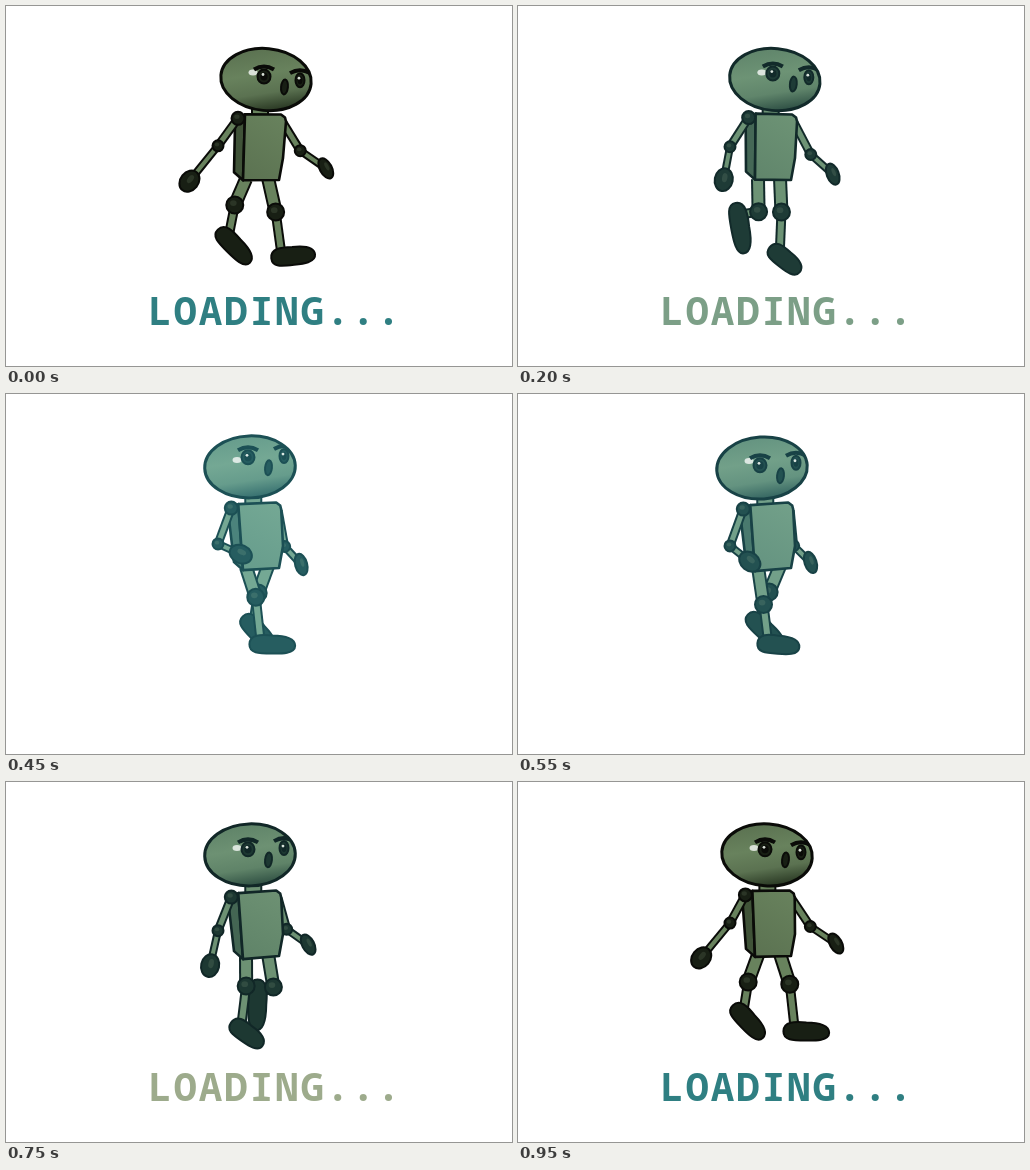
These frames come from a looping animation (506x360 px, 1000 ms). An HTML page with a canvas:

```html
<!DOCTYPE html>
<html lang="en">
<head>
<meta charset="utf-8">
<title>Loading</title>
<style>
html, body { margin: 0; width: 100%; height: 100%; overflow: hidden; background: #fff; }
canvas, svg { position: absolute; left: 0; top: 0; width: 506px; height: 360px; }
text { font: bold 39.2px "Noto Sans Mono", monospace; letter-spacing: 1.9px; stroke: #fff; }
</style>
</head>
<body>
<canvas id="stage" width="506" height="360"></canvas>
<svg viewBox="0 0 506 360"><text id="label" x="142" y="319"></text></svg>
<script>
const LOOP = 1000, STEP = 50;
const ctx = document.getElementById('stage').getContext('2d');
const label = document.getElementById('label');
const letters = [...'LOADING...'].map(ch => {
  const span = document.createElementNS('http://www.w3.org/2000/svg', 'tspan');
  span.textContent = ch;
  return label.appendChild(span);
});

const rgb = hex => [1, 3, 5].map(i => parseInt(hex.slice(i, i + 2), 16));
const css = c => `rgb(${c.map(Math.round)})`;
const mix = (a, b, k) => a.map((v, i) => v + (b[i] - v) * k);
const off = (p, x, y) => [p[0] + x, p[1] + y];
const clamp = x => Math.min(1, Math.max(0, x));
const ease = (u, from, to) => {
  const x = clamp((u - from) / (to - from));
  return x * x * (3 - 2 * x);
};
// Sum of harmonics, each given as [size, place of its peak in the loop]
const wave = (u, mid, ...parts) => parts.reduce(
  (sum, [size, peak], i) => sum + size * Math.cos(2 * Math.PI * (i + 1) * (u - peak)), mid);
const heading = (a, b) => Math.atan2(b[1] - a[1], b[0] - a[0]) * 180 / Math.PI;

// Both legs share this walk, half a loop apart
function stride(u, hip) {
  return {
    hip: off(hip, 0, -6),
    knee: off(hip, wave(u, 0.5, [9.8, 0.457], [3.2, 0.312]),
      wave(u, 25, [3.8, 0.547], [2.9, 0.153], [2.1, 0.24])),
    foot: off(hip, wave(u, 0.9, [19.5, 0.533], [7.3, 0.447], [2, 0.067]),
      wave(u, 62.6, [13, 0.649], [3.8, 0.489], [4.1, 0.053])),
    turn: wave(u, 41, [24.7, 0.136], [21.8, 0.25], [13.2, 0.292]),
    size: wave(u, 47, [6, 0.22])
  };
}

const WARM = { light: rgb('#68825d'), shade: rgb('#25331f'), line: rgb('#0a0b08') };
const COOL = { light: rgb('#74a894'), shade: rgb('#306a6c'), line: rgb('#1c5055') };

function palette(u) {
  const k = clamp(u < 0.45 ? u / 0.45 : (0.95 - u) / 0.5);
  const [light, shade, line] = ['light', 'shade', 'line'].map(n => mix(WARM[n], COOL[n], k));
  return {
    line: css(line), shade: css(shade), limb: css(light),
    mid: css(mix(light, shade, 0.2)),
    side: css(mix(light, shade, 0.6)),
    joint: css(mix(line, shade, 0.5)),
    glow: css(mix(line, light, 0.35)),
    spark: css(mix(light, [255, 255, 255], 0.75))
  };
}

function oval([x, y], rx, ry, fill, line, width = 3, turn = 0) {
  ctx.beginPath();
  ctx.ellipse(x, y, rx, ry, turn * Math.PI / 180, 0, 7);
  ctx.fillStyle = fill;
  ctx.fill();
  if (line) {
    ctx.strokeStyle = line;
    ctx.lineWidth = width;
    ctx.stroke();
  }
}

function poly(points, fill, line) {
  ctx.beginPath();
  points.forEach(p => ctx.lineTo(...p));
  ctx.closePath();
  ctx.fillStyle = fill;
  ctx.strokeStyle = line;
  ctx.lineWidth = 2.6;
  ctx.fill();
  ctx.stroke();
}

function limb(a, b, width, c) {
  for (const [w, color] of [[width + 4, c.line], [width, c.limb]]) {
    ctx.beginPath();
    ctx.moveTo(...a);
    ctx.lineTo(...b);
    ctx.lineWidth = w;
    ctx.strokeStyle = color;
    ctx.stroke();
  }
}

function joint(p, r, c) {
  oval(p, r - 1, r - 1, c.joint, c.line, 2);
  oval(off(p, -r * 0.15, -r * 0.2), r * 0.35, r * 0.3, c.glow);
}

function arm(shoulder, elbow, palm, [rx, ry], bend, c) {
  const turn = heading(elbow, palm) + bend;
  limb(shoulder, elbow, 5, c);
  limb(elbow, palm, 4, c);
  joint(elbow, 6.5, c);
  oval(palm, rx, ry, c.joint, c.line, 2, turn);
  oval(off(palm, 1, -2), rx * 0.4, ry * 0.3, c.glow, null, 0, turn);
}

function leg({ hip, knee, foot, turn, size }, c) {
  const a = turn * Math.PI / 180, x = -size * 0.25, y = -5;
  const ankle = off(foot, x * Math.cos(a) - y * Math.sin(a), x * Math.sin(a) + y * Math.cos(a));
  limb(hip, knee, 10, c);
  limb(knee, ankle, 6, c);
  ctx.save();
  ctx.translate(...foot);
  ctx.rotate(a);
  const h = size / 2 - 1;
  ctx.beginPath();
  ctx.moveTo(-h, 0);
  ctx.bezierCurveTo(-h, -10, -h * 0.5, -10, 0, -9);
  ctx.bezierCurveTo(h * 0.6, -9, h, -6, h, 1);
  ctx.bezierCurveTo(h, 9, h * 0.4, 9, 0, 9);
  ctx.bezierCurveTo(-h * 0.6, 9, -h, 9, -h, 0);
  ctx.fillStyle = c.joint;
  ctx.strokeStyle = c.line;
  ctx.lineWidth = 2;
  ctx.fill();
  ctx.stroke();
  ctx.restore();
  joint(knee, 9.5, c);
}

function eye(p, rx, c) {
  oval(p, rx, 7, c.joint, c.line, 2);
  oval(p, rx * 0.55, 4, c.line);
  oval(off(p, -1, -2), 1.4, 1.4, c.spark);

  const [x, y] = off(p, 0, -9);
  ctx.beginPath();
  ctx.moveTo(x - 10, y + 2);
  ctx.quadraticCurveTo(x, y - 4, x + 10, y + 2);
  ctx.strokeStyle = c.line;
  ctx.lineWidth = 4;
  ctx.stroke();
}

function head(u, x, c) {
  const y = wave(u, 73.2, [0, 0], [1, 0.1]);
  const nod = wave(u, -6, [2.5, 0.85], [5, 0.1]);
  const roll = wave(u, 0.8, [3.5, 0.1]);
  const g = ctx.createLinearGradient(x - 6, y - 32, x + 4, y + 33);
  g.addColorStop(0, c.mid);
  g.addColorStop(0.4, c.limb);
  g.addColorStop(0.7, c.mid);
  g.addColorStop(1, c.shade);
  oval([x, y], 45.3, 31, g, c.line, 3, roll * 1.5);
  ctx.save();
  ctx.clip();
  oval([x - 13, y - 7], 4.5, 3, c.spark);
  eye([x - 2, y + nod], 6.5, c);
  eye([x + 34, y + nod + roll], 4.5, c);
  oval([x + 18.5, y + nod + 10.5], 3.4, 7.5, c.joint, c.line, 2, 6);
  ctx.restore();
}

function robot(u) {
  const c = palette(u);
  const sway = 5 * ease(u, 0.75, 0.95) - 16 * ease(u, 0.12, 0.4);
  const lean = wave(u, 0, [2, 0.65]);
  const tl = [239 + sway * 0.42, 109.5 + lean], tr = [279 + sway * 0.3, 110.5];
  const bl = [237, 175.5 + lean], br = [273, 174];
  const shoulder = off(tl, -7, 4);
  ctx.lineJoin = 'round';

  arm(off(tr, -2, 6),
    [wave(u, 285.5, [10, 0.08]), wave(u, 148.5, [4, 0.45])],
    [wave(u, 306.5, [14, 0.05]), wave(u, 166, [5, 0.38])], [11, 6], 27, c);
  leg(stride((u + 0.5) % 1, [262, 178]), c);
  leg(stride(u, [240, 179]), c);

  limb([tl[0] + 15, 100], [tl[0] + 15, 114], 14, c);
  poly([tl, off(tl, -10, 9), off(bl, -9, -8), bl], c.side, c.line);
  const g = ctx.createLinearGradient(...tr, ...bl);
  g.addColorStop(0, c.limb);
  g.addColorStop(1, c.mid);
  poly([tl, off(tr, -4, -2), off(tr, 0, 1), off(tr, 1, 5), off(br, 4, -22), br, bl], g, c.line);

  arm(shoulder,
    [212, wave(u, 145.5, [6.5, 0.58])],
    [wave(u, 209, [26, 0.47]), wave(u, 173, [9, 0.87], [5, 0.2])], [11.5, 9], 0, c);
  joint(shoulder, 7.5, c);
  head(u, 260 + sway, c);
}

const TEAL = rgb('#2f7f82'), SAGE = rgb('#87a388'), SAND = rgb('#bab592');

// The letters pale and wear away, the left ones first, then come back
function caption(u) {
  const a = Math.abs(u - 0.515) * 2;
  const color = a > 0.6 ? mix(SAGE, TEAL, clamp((a - 0.6) / 0.25))
    : mix(SAND, SAGE, clamp((a - 0.3) / 0.3));
  const wear = Math.max(0, 0.42 - a) * 16;
  label.style.fill = css(color);
  label.style.visibility = a > 0.2 ? 'visible' : 'hidden';
  letters.forEach((el, i) => {
    el.style.strokeWidth = wear * Math.max(0, 1.6 - i * 0.22);
  });
}

function draw(now) {
  const u = Math.floor((now % LOOP) / STEP) * STEP / LOOP;
  ctx.clearRect(0, 0, 506, 360);
  robot(u);
  caption(u);
  requestAnimationFrame(draw);
}
draw(performance.now());
</script>
</body>
</html>
```
